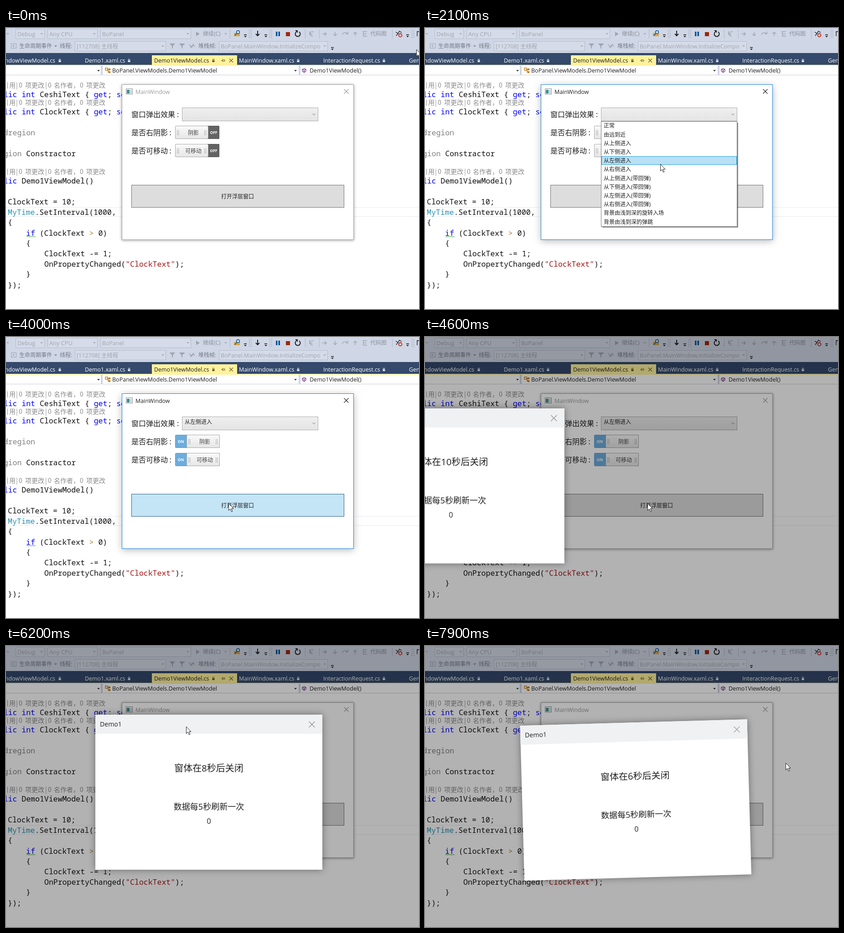
Animation of 906 by 618 pixels, one loop 8000 ms. Source, as an HTML page:

```html
<!DOCTYPE html>
<html lang="zh-CN">
<head>
<meta charset="utf-8">
<title>Popup demo</title>
<style>
html, body { margin: 0; width: 100%; height: 100%; overflow: hidden; background: #fff; }
svg { display: block; width: 100vw; height: 100vh; }
text { font: 12.4px "Open Sans", "Noto Sans CJK SC", sans-serif; white-space: pre; }
.code text { font: 300 16.5px "Noto Sans Mono", "Liberation Mono", monospace; }
.lens text { font: 14px "Noto Sans CJK SC", sans-serif; fill: #8c8c8c; }
.mid { text-anchor: middle; }
text.bold { font-weight: 700; }
.line { fill: none; stroke-width: 1.4; }
</style>
</head>
<body>
<svg id="stage" viewBox="0 0 906 618"></svg>
<script>
const LOOP = 8000, STEP = 100;
const DIM = '#a0a5b0', INK = '#1e1e1e', BLUE = '#0000ff', GRAY = '#808080';

const rect = (x, y, w, h, fill, more = '') =>
  `<rect x="${x}" y="${y}" width="${w}" height="${h}" fill="${fill}" ${more}/>`;
const box = (x, y, w, h, fill, stroke, more = '') =>
  rect(x + .5, y + .5, w - 1, h - 1, fill, `stroke="${stroke}" ${more}`);
const text = (x, y, s, size = 12.4, fill = INK, more = '') =>
  `<text x="${x}" y="${y}" style="font-size:${size}px" fill="${fill}" ${more}>${s}</text>`;
const line = (d, stroke, more = '') => `<path class="line" d="${d}" stroke="${stroke}" ${more}/>`;
const fill = (d, color) => `<path d="${d}" fill="${color}"/>`;
const caret = (x, y, color = DIM) => fill(`M${x - 3} ${y - 1.5}h6l-3 3z`, color);
const cross = (x, y, r, color) =>
  line(`M${x - r} ${y - r}l${2 * r} ${2 * r}M${x + r} ${y - r}l${-2 * r} ${2 * r}`, color, 'style="stroke-width:1.1"');
const dots = (x, y, cols, rows, gap, color) => {
  let s = '';
  for (let i = 0; i < cols * rows; i++)
    s += rect(x + i % cols * gap, y + Math.floor(i / cols) * gap, 1.4, 1.4, color);
  return s;
};

function toolbar() {
  const combo = (x, y, w, s, size) =>
    box(x, y, w, 22, '#d5dbe8', '#b4bccb') + text(x + 4, y + 15.5, s, size, DIM) + caret(x + w - 7, y + 11);
  const more = x => rect(x - 3, 14, 6, 1.5, INK) + caret(x, 19, INK);
  const sep = x => rect(x, 3, 1, 20, '#b0b8c8');
  const arrow = (x, turn) =>
    `<g transform="translate(${x} 13) rotate(${turn})">${line('M-5 0H4M0-4l4 4-4 4', DIM)}</g>`;
  const funnel = x => fill(`M${x} 34h12l-5 6v6l-2-2v-4z`, DIM);
  return rect(0, 0, 906, 55, '#cfd6e5') +
    caret(4, 13) + combo(21, 2, 64, 'Debug', 12.8) + combo(91, 2, 110, 'Any CPU', 12.8) +
    combo(207, 2, 199, 'BoPanel') +
    fill('M417 8l8 5-8 5z', DIM) + text(432, 17, '继续(C)', 12, '#8b909c') + caret(482, 13) + sep(491) +
    fill('M500 11h4l1-2h8v9h-13z', '#d9a441') +
    `<circle cx="509" cy="9" r="3.3" fill="#dfe6f2" stroke="#00539c" stroke-width="1.5"/>` +
    line('M506 12l-4 5', '#00539c') + more(525) + dots(533, 4, 2, 5, 4, '#8a93a5') +
    line('M552 6v10M548 13l4 4 4-4', INK, 'style="stroke-width:2"') + more(570) + dots(578, 4, 2, 5, 4, '#8a93a5') +
    rect(592, 8, 3.4, 10, '#00539c') + rect(597.6, 8, 3.4, 10, '#00539c') + rect(614, 9, 9, 9, '#a1260d') +
    line('M637 8.5a5.5 5.5 0 1 0 6 0', INK, 'style="stroke-width:2"') + fill('M634 5h6v6z', INK) + sep(656) +
    line('M666 7v7h6M675 9a5 5 0 1 0-2 9', DIM) + sep(687) +
    arrow(699, 0) + arrow(722, 90) + arrow(766, -90) +
    line('M738 15a6 6 0 0 1 11-2M750 8v5h-5', DIM) + line('M782 8h10M784 8v10h8M784 13h7', DIM) +
    text(799, 17, '代码图', 12, '#8b909c') + sep(847) +
    line('M855 9l5 3 3-5 5 3M856 17l5-6', INK) +
    `<circle cx="865" cy="16" r="3.5" fill="none" stroke="#c0281c" stroke-width="1.8"/>` +
    more(881) + dots(890, 4, 2, 5, 4, '#8a93a5') + line('M902 7v11M902 8h5', INK) +
    box(11, 34, 12, 11, 'none', DIM) + line('M18 37l-3 2.5 3 2.5', DIM) +
    text(29, 44, '生命周期事件', 12, '#747a87') + caret(109, 40, '#747a87') +
    text(118, 44, '线程:', 12, '#747a87') + combo(151, 29, 200, '[112708] 主线程') +
    funnel(359) + funnel(380) + line('M381 36h11', DIM) + line('M402 36l5 7 4-6 3 4M404 43l8-8', DIM) +
    text(422, 44, '堆栈帧:', 12, '#747a87') + combo(467, 29, 239, 'BoPanel.MainWindow.InitializeCompo') +
    rect(713, 42, 6, 1.5, INK) + caret(716, 47, INK);
}

function tabs() {
  const lock = (x, c) => rect(x - 2.5, 71, 5, 4, c) + line(`M${x - 1.5} 71v-2.5h3v2.5`, c, 'style="stroke-width:1"');
  const tab = (x, s, lockX) => text(x, 75.5, s, 12.4, '#fff') + lock(lockX, '#dfe4ee');
  return rect(0, 55, 906, 27, '#34496b') + rect(320, 60, 187, 22, '#fff29d') + rect(0, 81, 906, 2, '#fff29d') +
    text(108, 75.5, 'MainWindowViewModel.cs', 12.4, '#fff', 'text-anchor="end"') + lock(118, '#dfe4ee') +
    tab(173, 'Demo1.xaml.cs', 270) + tab(511, 'MainWindow.xaml.cs', 641) +
    tab(696, 'InteractionRequest.cs', 829) + text(884, 75.5, 'General.cs', 12.4, '#fff') +
    text(325, 75.5, 'Demo1ViewModel.cs') + lock(455, '#6b5a2a') +
    line('M472 71.5h3M475 68.5v6M475 70h5v3h-5', '#6b5a2a', 'style="stroke-width:1"') + cross(494, 71.5, 4, '#6b5a2a') +
    rect(0, 83, 906, 21, '#fff') + rect(0, 103, 906, 1, '#cccedb') +
    rect(208, 83, 4, 21, '#cfd6e5') + rect(642, 83, 4, 21, '#cfd6e5') +
    caret(203, 94, INK) + caret(635, 94, INK) +
    line('M218 88h5v5h-5zM222 91h5M224 91v6h4', '#c27d1a') + rect(225, 89, 4, 4, '#c27d1a') + rect(225, 95, 4, 4, '#c27d1a') +
    text(233, 97.5, 'BoPanel.ViewModels.Demo1ViewModel', 12.5) +
    line('M654 89l4 2v4l-4 2.5-4-2.5v-4zM650 91l4 2 4-2M654 93v4', '#68217a', 'style="stroke-width:1.1"') +
    text(666, 97.5, 'Demo1ViewModel()', 12.5);
}

function editor() {
  const lens = y => [[-8, '引'], [7, '用'], [22, '|'], [28, '0'], [42, '项更改'], [86, '|'], [92, '0'],
    [105, '名作者，'], [162, '0'], [176, '项更改']].map(([x, s]) => `<text x="${x}" y="${y}">${s}</text>`).join('');
  const code = (x, y, ...parts) => parts.map(p => {
    const [s, c] = Array.isArray(p) ? p : [p, '#111'];
    const out = `<text x="${x}" y="${y}" fill="${c}">${s.replace('>', '&gt;')}</text>`;
    x += 9.9 * s.length;
    return out;
  }).join('');
  const prop = (y, name) => code(-35, y, ['public int ', BLUE], name + ' { ', ['get', BLUE], '; ', ['set', BLUE], '; }');
  let wave = 'M45 460';
  for (let i = 0; i < 5; i++) wave += 'l2-2 2 2';
  return box(-2, 394, 912, 21, 'none', '#eaeaf2') +
    `<g class="lens">${lens(131) + lens(169) + lens(321)}</g><g class="code">` +
    prop(152, 'CeshiText') + prop(190, 'ClockText') +
    code(-35, 236, ['#endregion', GRAY]) + code(-35, 282, ['#region ', GRAY], 'Constractor') +
    code(-35, 342, ['public ', BLUE], 'Demo1ViewModel()') +
    code(4, 388, 'ClockText = 10;') + code(4, 411, ['MyTime', '#2b91af'], '.SetInterval(1000,') +
    code(4, 433, '{') + code(44, 457, ['if', BLUE], ' (ClockText ', ['>', '#b07a20'], ' 0)') +
    code(44, 479, '{') + code(84, 502, 'ClockText -= 1;') +
    code(84, 525, 'OnPropertyChanged(', ['"ClockText"', '#a31515'], ');') +
    code(44, 547, '}') + code(4, 571, '});') + '</g>' + line(wave, '#3a9a3a', 'style="stroke-width:1"');
}

function toggle(id, y, label) {
  return `<g clip-path="url(#${id}Clip)"><g id="${id}">` +
    box(346, y, 28, 29, '#6cadde', '#5b9ccd') + text(358.5, y + 18, 'ON', 8.5, '#fff', 'class="mid bold"') +
    box(440, y, 28, 29, '#636363', '#555') + text(455.5, y + 18, 'OFF', 8.5, '#fff', 'class="mid bold"') +
    box(371, y, 73, 29, 'url(#knob)', '#a6a6a6', 'rx="2"') +
    dots(375, y + 10, 2, 4, 3, '#8a8a8a') + dots(435, y + 10, 2, 4, 3, '#8a8a8a') +
    text(411, y + 19.5, label, 12, '#444', 'class="mid"') +
    `</g></g><clipPath id="${id}Clip">${rect(371, y, 98, 29, '#000', 'rx="3"')}</clipPath>`;
}

const ROW = 19.2;
const ITEMS = ['正常', '由远到近', ...['', '(带回弹)'].flatMap(end => [...'上下左右'].map(s => `从${s}侧进入${end}`)),
  '背景由浅到深的旋转入场', '背景由浅到深的弹跳'];

function mainWindow() {
  return `<rect id="frame" x="254.5" y="124.5" width="508" height="341" fill="#fff"/>` +
    box(263, 133, 15, 13, '#f4f6f8', '#8a949c') + rect(265, 136, 6, 8, '#3f8f8a') + rect(272, 136, 4, 8, '#c9d3dc') +
    text(284, 144.5, 'MainWindow', 12.4, INK, 'id="title"') + `<g id="close">${cross(746.5, 139.5, 5, 'currentColor')}</g>` +
    text(275, 196, '窗口弹出效果', 16) + text(375, 196, ':', 16) +
    text(275, 236, '是否右阴影', 16) + text(358.5, 236, ':', 16) +
    text(275, 276, '是否可移动', 16) + text(358.5, 276, ':', 16) +
    box(386, 175, 299, 30, 'url(#combo)', '#acacac') + line('M672.5 188.5l3 3 3-3', '#606060', 'style="stroke-width:1"') +
    text(392, 190.5, ITEMS[4], 12, INK, 'id="choice"') +
    toggle('shade', 215, '阴影') + toggle('move', 255, '可移动') +
    `<rect id="button" x="275.5" y="345.5" width="466" height="49"/>` +
    text(508, 374.5, '打开浮层窗口', 12, INK, 'class="mid"') +
    '<g id="list">' + rect(389, 208, 298, 231, '#000', 'opacity=".42"') + box(386, 205, 299, 232, '#fff', '#7a7a7a') +
    `<rect id="hover" x="387.5" width="296" height="18" fill="#b9e0f5" stroke="#26a0da"/>` +
    ITEMS.map((s, i) => text(392, Math.round(219.4 + i * ROW), s, 12)).join('') + '</g>';
}

function popup() {
  return '<g id="popup">' +
    rect(0, 0, 498, 341, '#fff', 'style="filter:drop-shadow(0 0 8px rgba(0,0,0,.4))"') +
    rect(0, 0, 498, 42, '#f0f1f3') + text(10, 26, 'Demo1', 14.1) + cross(475, 21.5, 6.5, '#8c8c8c') +
    text(249, 125, '', 20, INK, 'class="mid" id="count"') +
    text(249, 209, '数据每5秒刷新一次', 18, INK, 'class="mid"') + text(249, 240, '0', 16, INK, 'class="mid"') + '</g>';
}

const grad = (id, a, b) => `<linearGradient id="${id}" x2="0" y2="1"><stop stop-color="${a}"/>` +
  `<stop offset="1" stop-color="${b}"/></linearGradient>`;

document.getElementById('stage').innerHTML =
  `<defs>${grad('combo', '#efefef', '#e4e4e4') + grad('knob', '#fafafa', '#e6e6e6')}</defs>` +
  rect(0, 0, 906, 618, '#fff') + editor() + toolbar() + tabs() + mainWindow() +
  rect(0, 0, 906, 618, '#000', 'id="mask" opacity=".3"') + popup() +
  '<path id="cursor" d="M.5.5v15l3.5-3.3 2.6 6 2.3-1-2.5-5.8h4.6z" fill="#fff" stroke="#222"/>';

const $ = id => document.getElementById(id);
const show = (id, on) => $(id).setAttribute('visibility', on ? 'visible' : 'hidden');
const clamp = v => Math.min(1, Math.max(0, v));
const smooth = p => p * p * (3 - 2 * p);
const track = (rows, t, ease = p => p) => {
  const i = rows.findIndex(r => r[0] > t);
  if (i < 1) return rows[i < 0 ? rows.length - 1 : 0].slice(1);
  const [a, b] = [rows[i - 1], rows[i]];
  const p = ease((t - a[0]) / (b[0] - a[0]));
  return a.slice(1).map((v, k) => v + (b[k + 1] - v) * p);
};

// time, x, y
const PATH = [
  [0, 900, 47], [900, 520, 190], [1000, 520, 190], [1300, 516, 225], [1700, 517, 264], [1800, 517, 264],
  [2100, 516, 299], [2300, 516, 297], [2500, 440, 228], [2800, 440, 228], [3100, 440, 266], [3500, 440, 266],
  [4000, 488, 366], [5100, 488, 366], [5500, 377, 183], [5700, 405, 191], [6000, 448, 175], [6200, 395, 177],
  [6500, 407, 195], [7100, 760, 249], [7300, 775, 252], [7900, 791, 257]];
// time, degrees
const SWING = [[7037, 0], [7235, 15], [7300, 8.7], [7435, -10], [7635, 5], [7835, -5], [7900, -1.6], [8000, 0]];
const GRAB = 5500, DROP = 6500;

function draw(t) {
  const [cx, cy] = track(PATH, t, smooth);
  $('cursor').setAttribute('transform', `translate(${cx} ${cy})`);

  const active = t >= 900 && t < 4300;
  $('frame').setAttribute('stroke', active ? '#1883d7' : '#a3a3a3');
  $('frame').style.filter = active ? 'drop-shadow(0 3px 8px rgba(0,0,0,.27))' : 'drop-shadow(0 1px 3px rgba(0,0,0,.4))';
  $('title').setAttribute('fill', active ? INK : '#999');
  $('close').style.color = active ? INK : '#999';

  const row = Math.floor((cy - 206) / ROW);
  const open = t >= 1000 && t < 2300;
  show('list', open);
  show('hover', open && row >= 0);
  $('hover').setAttribute('y', Math.round(206 + row * ROW) - .5);
  show('choice', t >= 2300);

  const slide = (id, start) => $(id).setAttribute('transform', `translate(${25 * smooth(clamp((t - start) / 200))} 0)`);
  slide('shade', 2600);
  slide('move', 3300);

  const hot = active && cy > 345 && cy < 395 && !open;
  $('button').setAttribute('fill', hot ? '#c4e5f6' : '#ddd');
  $('button').setAttribute('stroke', hot ? '#2c628b' : '#707070');

  show('mask', t >= 4300);
  show('popup', t >= 4600);
  const enter = 1 - (1 - clamp((t - 4500) / 550)) ** 3;
  const [gx, gy] = track(PATH, Math.min(DROP, Math.max(GRAB, t)), smooth);
  const x = gx - 199 - (1 - enter) * 676, y = gy - 26;
  $('popup').setAttribute('transform', `translate(${x} ${y}) rotate(${track(SWING, t)[0]} 223.4 -17.7)`);
  $('count').textContent = `窗体在${10 - Math.max(0, Math.floor((t - 3800) / 1000))}秒后关闭`;
}

const begin = performance.now();
function tick() {
  const t = (performance.now() - begin) % LOOP;
  draw(Math.floor(t / STEP) * STEP);
  requestAnimationFrame(tick);
}
tick();
</script>
</body>
</html>
```
